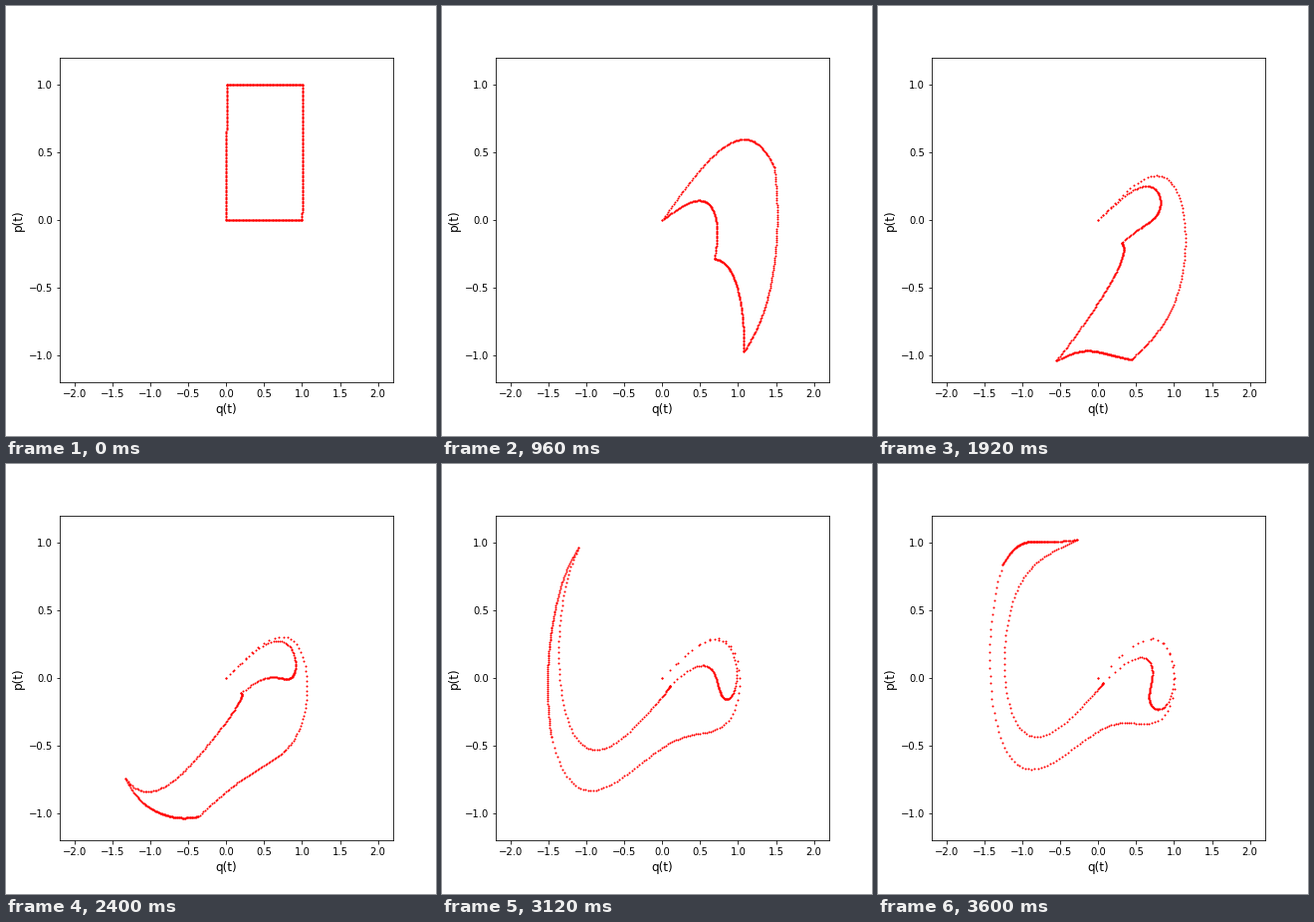
Animation of 432x432 px, one loop 3720 ms. Source, as a matplotlib script:

```python
import numpy as np
import matplotlib.pyplot as plt
from matplotlib.animation import FuncAnimation

FRAMES, STEPS, DT = 31, 100, 1e-3
A, B = 3, 0.5
SIDE = 100


def force(q):
    return -8 / A * q * (q * q - B)


def unit_square():
    s = np.linspace(0, 1, SIDE)
    zero, one = np.zeros(SIDE), np.ones(SIDE)
    q = np.concatenate([s, s, zero, one])
    p = np.concatenate([zero, one, s, s])
    return q, p


def evolve():
    """States of the square's border under q'' = force(q), p = q'/2."""
    prev, p = unit_square()
    q = prev + 2 * DT * p
    states = [(q, p)]
    for n in range(1, (FRAMES - 1) * STEPS + 1):
        p = p + DT * force(prev) / 2
        prev, q = q, q + 2 * DT * p
        if n % STEPS == 0:
            states.append((q, p))
    return states


plt.rcParams.update({"font.family": "DejaVu Sans", "font.size": 10})
fig = plt.figure(figsize=(6, 6), dpi=72, facecolor="white")
fig.subplots_adjust(left=0.125, right=0.9, bottom=0.125, top=0.88)
ax = fig.add_subplot()
ax.set_xlim(-2.2, 2.2)
ax.set_ylim(-1.2, 1.2)
ax.set_xticks(np.arange(-2, 2.1, 0.5))
ax.set_yticks(np.arange(-1, 1.1, 0.5))
ax.set_xlabel("q(t)", fontsize=12)
ax.set_ylabel("p(t)", fontsize=12)

states = evolve()
dots, = ax.plot([], [], "o", color="red", markersize=1, markeredgewidth=1)


def draw(i):
    dots.set_data(*states[i])
    return dots,


anim = FuncAnimation(fig, draw, frames=FRAMES, interval=120,
                     repeat=True, repeat_delay=0)
plt.show()
```
